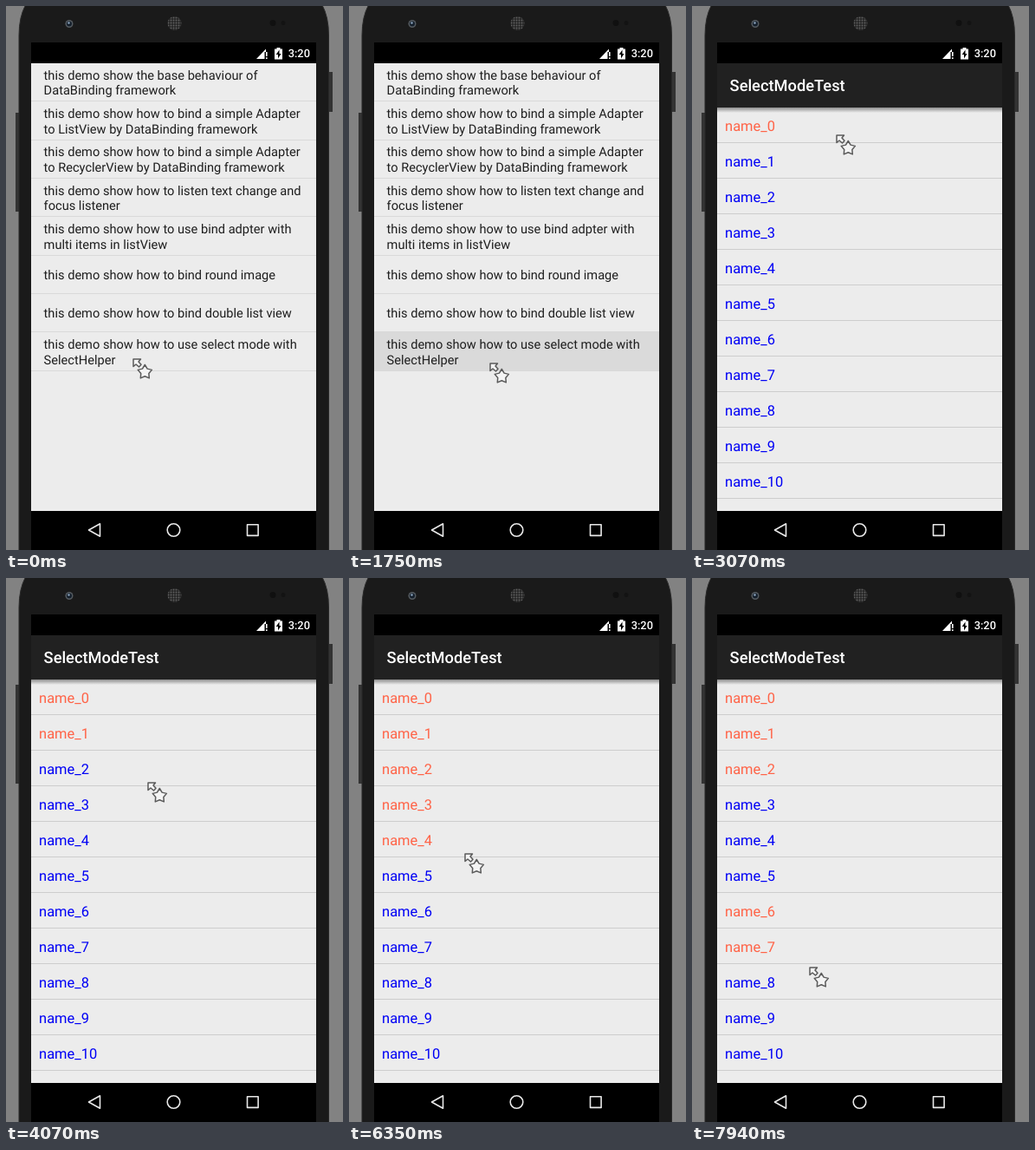
Recreate the animation shown at these times as an HTML page. Size 389 by 627 pixels, loop 8 s.

```html
<!DOCTYPE html>
<html lang="en">
<head>
<meta charset="utf-8">
<title>Select mode demo</title>
<style>
  html, body { margin: 0; width: 100%; height: 100%; overflow: hidden; background: #828282; }
  svg { display: block; width: 389px; height: 627px; font-family: Roboto, sans-serif; }
  text { text-rendering: geometricPrecision; }
  .intro { font-size: 14.62px; fill: #1e1e1e; }
  .name { font-size: 16.45px; fill: #0000f5; }
  .name.on { fill: #ff6347; }
  .title { font-size: 18.28px; font-weight: 500; fill: #fff; }
  .clock { font-size: 12.8px; font-weight: 500; fill: #fff; }
  .nav { fill: none; stroke: #e8e8e8; stroke-width: 1.6; stroke-linejoin: round; }
  .pointer { fill: #f4f4f4; stroke: #5a5a5a; stroke-width: 1.5; stroke-linejoin: round; }

  /* The second page rises and fades in when the last row is tapped. */
  #press { animation: press 8s step-end infinite; }
  #page { animation: rise 8s infinite, fade 8s infinite; }
  @keyframes press { 0% { opacity: 0 } 21.875% { opacity: .08 } }
  @keyframes rise {
    0%, 23.25% { transform: translateY(47px); animation-timing-function: cubic-bezier(.1, .8, .2, 1) }
    26.3%, 100% { transform: none }
  }
  @keyframes fade {
    0%, 23.25% { opacity: 0; animation-timing-function: ease-out }
    25.5%, 100% { opacity: 1 }
  }
</style>
</head>
<body>
<svg viewBox="0 0 389 627">
  <defs>
    <clipPath id="screen"><rect x="29" y="42" width="329" height="585"/></clipPath>
    <linearGradient id="shade" x2="0" y2="1">
      <stop stop-color="#000" stop-opacity=".4"/>
      <stop offset="1" stop-color="#000" stop-opacity="0"/>
    </linearGradient>
    <pattern id="mesh" width="3" height="3" patternUnits="userSpaceOnUse">
      <rect width="3" height="3" fill="#252525"/>
      <circle cx="1.5" cy="1.5" r=".95" fill="#606060"/>
    </pattern>
  </defs>

  <!-- phone body -->
  <rect width="389" height="627" fill="#828282"/>
  <rect x="11" y="123" width="5" height="114" fill="#333"/>
  <rect x="371" y="76" width="6" height="46" fill="#333"/>
  <path d="M23 -2Q15 12 15 34V630H372.5V34Q372.5 12 364.5 -2Z" fill="#1a1a1a" stroke="#2a2a2a"/>
  <circle cx="73" cy="20.5" r="4.5" fill="#555b60"/>
  <circle cx="73" cy="20.5" r="3" fill="#15202c"/>
  <circle cx="72.5" cy="19.5" r="1.2" fill="#8fa6c0"/>
  <circle cx="194.5" cy="20" r="8" fill="url(#mesh)"/>
  <circle cx="308" cy="19.5" r="3.5" fill="#101010"/>
  <circle cx="320" cy="19.5" r="2.5" fill="#131313"/>

  <g clip-path="url(#screen)">
    <rect x="29" y="42" width="329" height="585"/>
    <g id="menu">
      <rect x="29" y="66" width="329" height="516" fill="#ececec"/>
      <rect id="press" x="29" y="376" width="329" height="44"/>
    </g>
    <g id="page">
      <rect x="29" y="42" width="329" height="640"/>
      <rect x="29" y="117" width="329" height="465" fill="#ececec"/>
      <rect x="29" y="66" width="329" height="51" fill="#212121"/>
      <rect x="29" y="117" width="329" height="6" fill="url(#shade)"/>
      <text class="title" x="43.6" y="98">SelectModeTest</text>
    </g>
  </g>

  <!-- system bars -->
  <path d="M289 61L300 49.5V61Z" fill="#fff"/>
  <path d="M298.500 53h5v9h-5z"/>
  <path d="M300 53h1.600v5h-1.600zM300 59.300h1.600v1.700h-1.600z" fill="#fff"/>
  <path d="M310 49.5h2.500V48h4v1.500H319V61.500H310Z" fill="#fff"/>
  <path d="M315.500 50.500L311.700 56h2.300v4.500L317.500 55h-2Z"/>
  <text class="clock" x="325.700" y="59">3:20</text>
  <g class="nav">
    <path d="M95.500 604L108.500 596.800V611.200Z"/>
    <circle cx="193.500" cy="604" r="7.300"/>
    <rect x="278.500" y="597.800" width="12.600" height="12.600"/>
  </g>

  <g id="pointer" class="pointer">
    <path d="M1 1H9.500L7 4L10 7.300L7.500 10L4 7L1 9.500Z"/>
    <path id="star"/>
  </g>
</svg>
<script>
const LOOP = 8000, STEP = 90;
const LIST_TOP = 117, ROW = 41;
const $ = id => document.getElementById(id);

function add(parent, tag, attrs, text = '') {
  const el = document.createElementNS('http://www.w3.org/2000/svg', tag);
  for (const key in attrs) el.setAttribute(key, attrs[key]);
  el.textContent = text;
  return parent.appendChild(el);
}
const divider = (parent, y, fill) =>
  add(parent, 'rect', { x: 29, y, width: 329, height: 1, fill });

const entries = [
  'the base behaviour of|DataBinding framework',
  'how to bind a simple Adapter|to ListView by DataBinding framework',
  'how to bind a simple Adapter|to RecyclerView by DataBinding framework',
  'how to listen text change and|focus listener',
  'how to use bind adpter with|multi items in listView',
  'how to bind round image',
  'how to bind double list view',
  'how to use select mode with|SelectHelper'
];
entries.forEach((entry, i) => {
  const lines = ('this demo show ' + entry).split('|');
  const shift = 44.33 * i;
  lines.forEach((line, n) => add($('menu'), 'text', {
    class: 'intro', x: 43.6, y: Math.round(93.45 + shift + 17.7 * (n - (lines.length - 1) / 2))
  }, line));
  divider($('menu'), Math.floor(109.9 + shift), '#d9d9d9');
});

const names = Array.from({ length: 11 }, (_, i) => {
  const top = LIST_TOP + ROW * i;
  divider($('page'), top + 40, '#cdcdcd');
  return add($('page'), 'text', { class: 'name', x: 38.1, y: top + 26.6 }, 'name_' + i);
});

const starPoints = Array.from({ length: 10 }, (_, i) => {
  const r = i % 2 ? 4.8 : 8.5, a = Math.PI * (i / 5 - 0.5);
  return `${(14.3 + r * Math.cos(a)).toFixed(2)} ${(16 + r * Math.sin(a)).toFixed(2)}`;
});
$('star').setAttribute('d', `M${starPoints.join('L')}Z`);

// Places where the pointer rests: time it leaves, x, y.
const stops = [
  [640, 146, 406], [920, 164, 405], [1840, 162, 411], [2200, 181, 384],
  [2980, 165, 142], [3800, 175, 188], [4250, 163, 235], [4670, 149, 263],
  [5120, 139, 308], [5540, 133, 348], [6170, 129, 351], [6440, 133, 317],
  [6980, 153, 260], [7340, 148, 372], [7760, 135, 426], [8120, 135, 448]
];

// On the second page each rest ends with a tap on the row below the pointer.
const taps = stops.filter(([time]) => time > 2200)
  .map(([time, , y]) => ({ time, row: Math.floor((y + 2 - LIST_TOP) / ROW) }));

// It sets off one step after a tap and arrives two steps before the next.
function pointerAt(t) {
  const next = stops.findIndex(([leave]) => t < leave);
  const [leave, x, y] = stops[next];
  const [left, fromX, fromY] = stops[Math.max(0, next - 1)];
  const moved = Math.floor((t - left) / STEP) * STEP;
  const done = Math.max(0, Math.min(1, moved / (leave - left - 2 * STEP)));
  const mix = (a, b) => Math.round(a + (b - a) * done);
  return [mix(fromX, x), mix(fromY, y)];
}

const began = performance.now();
function draw() {
  const t = (performance.now() - began) % LOOP;
  names.forEach((el, row) => {
    const count = taps.filter(tap => tap.row === row && tap.time <= t).length;
    el.classList.toggle('on', count % 2 === 1);
  });
  $('pointer').setAttribute('transform', `translate(${pointerAt(t)})`);
  requestAnimationFrame(draw);
}
draw();
</script>
</body>
</html>
```
